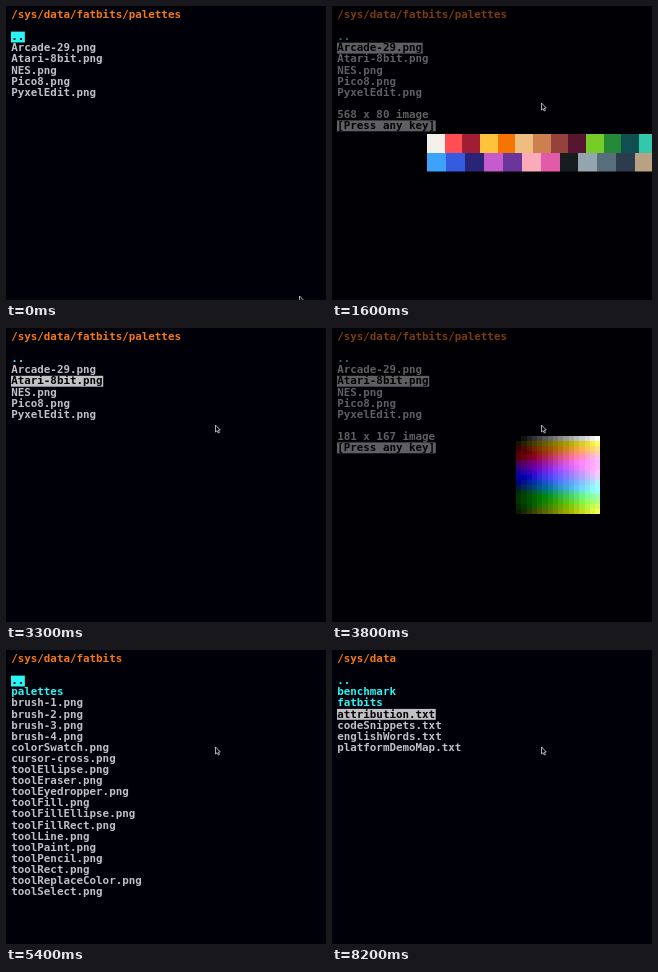
Recreate the animation shown at these times as an HTML page with a canvas. Size 320 by 294 pixels, loop 8440 ms.

```html
<!DOCTYPE html>
<html lang="en">
<head>
<meta charset="utf-8">
<title>File browser</title>
<style>
html, body { margin: 0; width: 100%; height: 100%; overflow: hidden; background: #000008; }
canvas { display: block; width: 320px; height: 294px; }
</style>
</head>
<body>
<canvas id="stage" width="320" height="294"></canvas>
<script>
const ctx = document.getElementById('stage').getContext('2d');
const LOOP = 8440;
const LEFT = 5, CHAR = 6.53, BASE = 12, LINE = 11.1;
const BACK = '#000008', ORANGE = '#f57a14', CYAN = '#2cf5f5', GRAY = '#c0c0c6';

const folders = {
  palettes: {
    path: '/sys/data/fatbits/palettes',
    dirs: ['..'],
    files: ['Arcade-29.png', 'Atari-8bit.png', 'NES.png', 'Pico8.png', 'PyxelEdit.png']
  },
  fatbits: {
    path: '/sys/data/fatbits',
    dirs: ['..', 'palettes'],
    files: ['brush-1.png', 'brush-2.png', 'brush-3.png', 'brush-4.png', 'colorSwatch.png',
      'cursor-cross.png', 'toolEllipse.png', 'toolEraser.png', 'toolEyedropper.png',
      'toolFill.png', 'toolFillEllipse.png', 'toolFillRect.png', 'toolLine.png',
      'toolPaint.png', 'toolPencil.png', 'toolRect.png', 'toolReplaceColor.png', 'toolSelect.png']
  },
  data: {
    path: '/sys/data',
    dirs: ['..', 'benchmark', 'fatbits'],
    files: ['attribution.txt', 'codeSnippets.txt', 'englishWords.txt', 'platformDemoMap.txt']
  }
};

// [start ms, folder, selected row, preview]
const scenes = [
  [0, 'palettes', 0],
  [600, 'palettes', 1],
  [1600, 'palettes', 1, 'arcade'],
  [2400, 'palettes', 1],
  [3300, 'palettes', 2],
  [3800, 'palettes', 2, 'atari'],
  [4600, 'palettes', 2],
  [5000, 'palettes', 1],
  [5100, 'palettes', 0],
  [5400, 'fatbits', 0],
  [6600, 'data', 0],
  [7600, 'data', 1],
  [7800, 'data', 2],
  [8200, 'data', 3]
];

const swatches = [
  '#f3efe9 #ff4f52 #9f1d35 #ffc23b #f57402 #f0bd80 #cc8050 #96413c #57152f #78cc28 #258a38 #104e52 #32c8ab #a8e8c0 #70d8f0'.split(' '),
  '#3ca2fa #345be0 #292476 #c65bce #6c359b #fbaaba #e35ba8 #171d1f #95a5ae #596e7c #2c3c4c #b9a183 #7c6450 #4c3838'.split(' ')
];

const previews = {
  arcade: { label: '568 x 80 image', draw: drawArcade },
  atari: { label: '181 x 167 image', draw: drawAtari }
};

function rect(x, y, w, h, color) {
  ctx.fillStyle = color;
  ctx.fillRect(x, y, w, h);
}

function print(text, row, color, selected) {
  const y = BASE + row * LINE;
  if (selected) rect(LEFT, y - 8.6, text.length * CHAR + 0.8, 10.9, color);
  ctx.fillStyle = selected ? '#000' : color;
  ctx.fillText(text, LEFT + 0.2, y);
}

function drawArcade() {
  swatches.forEach((colors, row) => {
    const w = 265 / colors.length;
    colors.forEach((color, i) => {
      const x = Math.round(95 + i * w);
      rect(x, 128 + row * 19, Math.round(95 + (i + 1) * w) - x, row ? 18.5 : 19, color);
    });
  });
}

// Hue by row, brightness by column, converted from YIQ.
function atariColor(hue, level) {
  const angle = (hue * 25 - 65) * Math.PI / 180;
  const sat = hue ? 0.3 : 0;
  const y = level / 15 * (hue ? 0.93 : 1);
  const i = sat * Math.cos(angle), q = sat * Math.sin(angle);
  const rgb = [y + 0.956 * i + 0.621 * q, y - 0.272 * i - 0.647 * q, y - 1.106 * i + 1.703 * q];
  return `rgb(${rgb.map(v => Math.round(255 * Math.min(1, Math.max(0, v))))})`;
}

function drawAtari() {
  const left = i => Math.round(184 + i * 84.4 / 16);
  const top = i => Math.round(108 + i * 77.9 / 16);
  for (let hue = 0; hue < 16; hue++) {
    for (let level = 0; level < 16; level++) {
      const x = left(level), y = top(hue);
      rect(x, y, left(level + 1) - x, top(hue + 1) - y, atariColor(hue, level));
    }
  }
}

function drawPointer(t) {
  const [x, y] = t < 100 ? [293.5, 290] : t < 200 ? [236, 158] : [209.5, 97];
  ctx.beginPath();
  [[0, 0], [0, 7], [1.6, 5.6], [2.8, 8], [3.9, 7.5], [2.9, 5.1], [4.8, 5]]
    .forEach(([dx, dy]) => ctx.lineTo(x + dx, y + dy));
  ctx.closePath();
  ctx.fillStyle = '#000';
  ctx.fill();
  ctx.strokeStyle = '#d8d8d8';
  ctx.lineWidth = 0.8;
  ctx.stroke();
}

function draw(t) {
  const [, name, selected, previewName] = scenes.findLast(scene => scene[0] <= t);
  const { path, dirs, files } = folders[name];
  const preview = previews[previewName];

  rect(0, 0, 320, 294, BACK);
  ctx.font = 'bold 10.85px "DejaVu Sans Mono", monospace';
  print(path, 0, ORANGE);
  [...dirs, ...files].forEach((entry, i) =>
    print(entry, i + 2, i < dirs.length ? CYAN : GRAY, i === selected));

  if (preview) {
    print(preview.label, 9, GRAY);
    print('[Press any key]', 10, GRAY, true);
    rect(0, 0, 320, 294, 'rgba(0, 0, 0, 0.5)');
    preview.draw();
  }
  drawPointer(t);
}

function tick() {
  draw(performance.now() % LOOP);
  requestAnimationFrame(tick);
}
tick();
</script>
</body>
</html>
```
